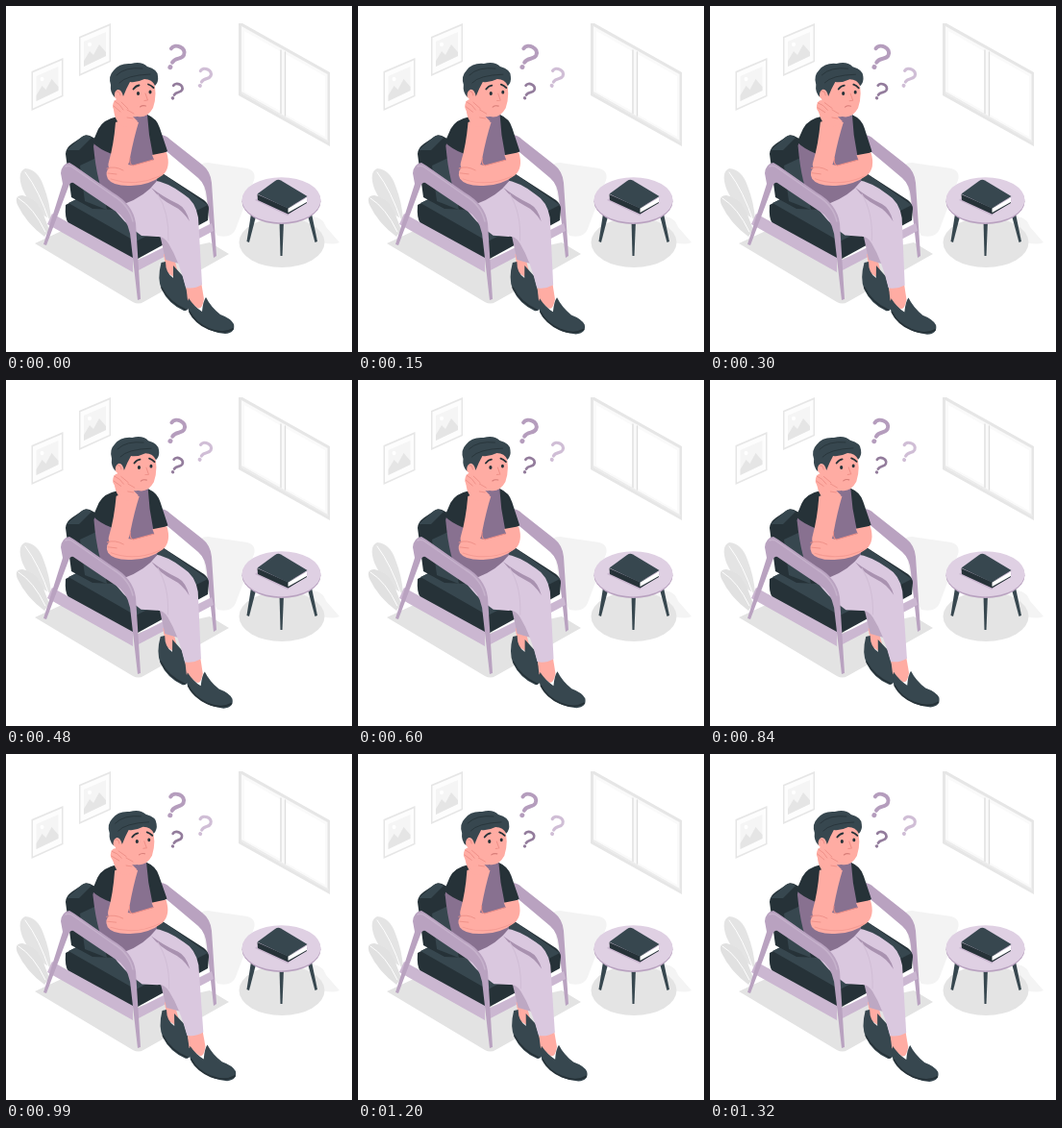
An HTML page with a canvas for the animation above (1350 ms loop, 360x360 px).

```html
<!DOCTYPE html>
<html lang="en">
<head>
<meta charset="utf-8">
<title>Thinking in an armchair</title>
<style>
html, body { margin: 0; width: 100%; height: 100%; overflow: hidden; background: #fff; }
canvas { display: block; width: 360px; height: 360px; }
</style>
</head>
<body>
<canvas id="stage" width="360" height="360"></canvas>
<script>
const ctx = document.getElementById('stage').getContext('2d');
const LOOP = 1350, STEP = 30;
const dark = '#263238', slate = '#37474f', skin = '#ffaca3', skinShade = '#ee8f87';
const lilac = '#cbb7d1', lilacDark = '#b9a2c0', pants = '#dac8df', vest = '#887190';

const paths = new Map();
function path(d) {
  if (!paths.has(d)) paths.set(d, new Path2D(d));
  return paths.get(d);
}
function fill(d, color) {
  ctx.fillStyle = color;
  ctx.fill(path(d));
}
function line(d, color, width = 1) {
  ctx.strokeStyle = color;
  ctx.lineWidth = width;
  ctx.stroke(path(d));
}
function oval(x, y, rx, ry, color, turn = 0) {
  ctx.fillStyle = color;
  ctx.beginPath();
  ctx.ellipse(x, y, rx, ry, turn, 0, Math.PI * 2);
  ctx.fill();
}
function turned(x, y, angle, draw) {
  ctx.save();
  ctx.translate(x, y);
  ctx.rotate(angle);
  ctx.translate(-x, -y);
  draw();
  ctx.restore();
}

function picture(x, y) {
  ctx.save();
  ctx.translate(x, y);
  fill('M0 0 L33 -14 V26 L0 41 Z', '#e6e6e6');
  fill('M1.5 1.2 L31.5 -11.6 V25 L1.5 38.5 Z', '#fdfdfd');
  fill('M5 5 L28 -5 V20 L5 31 Z', '#f5f5f5');
  fill('M5 25 L11 15 L15 19 L21 8 L28 16 V20 L5 31 Z', '#e5e5e5');
  oval(11, 8, 2, 2.3, '#fff');
  ctx.restore();
}

function windowFrame() {
  fill('M242 18 L246 18 L337 69 V146 L242 93 Z', '#e6e6e6');
  fill('M245 21 L334.5 71 V141 L245 91 Z', '#fafafa');
  fill('M248 26 L285 47 V109 L248 89 Z', '#fff');
  fill('M291 50 L332 73 V136 L291 113 Z', '#fff');
  line('M286 46 V112 M290.5 48 V114', '#dedede', 1.3);
  line('M245 90 L335 141', '#ececec', 1.5);
}

function floor() {
  fill('M203 172 Q200 163 210 163 L251 169 Q262 172 257 184 L239 232 Q235 242 220 239 L212 225 Z', '#f3f3f3');
  fill('M300 216 L324 220 Q330 222 333 230 L347 246 Q341 249 329 246 Z', '#f4f4f4');
  fill('M30 247 L58 234 L140 262 L212 246 L232 258 L143 308 Q138 311 132 308 Z', '#e3e3e3');
  oval(287, 246, 44.5, 26, '#e4e4e4');
}

function plant() {
  fill('M46 222 Q26 211 17 190 Q11 173 20 169 Q33 170 39 187 Q46 205 47 223 Z', '#e4e4e4');
  fill('M40 240 Q21 226 12 207 Q8 197 17 197 Q32 200 39 217 L45 233 Z', '#e1e1e1');
  line('M20 173 Q35 193 45 224 M13 200 Q29 210 41 235', '#fff', 1);
}

function chairBack() {
  fill('M160 134 Q166 134 171 139 L204 165 Q213 172 214 184 L219 260 L216 262 L209 200 Q208 186 200 179 L162 147 Z', lilacDark);
  fill('M136 265 L214 226 L216 234 L136 276 Z', lilac);
  fill('M62 207 L98 188 L158 171 L206 202 Q211 206 211 211 L210 223 L137 263 Q133 264 129 262 L65 226 Q61 222 62 207 Z', dark);
  fill('M65 205 L102 187 L158 171 L210 207 L135 245 Z', slate);
  fill('M62 154 Q62 148 69 143 L81 135 Q85 133 91 137 L114 150 L114 212 L90 211 L68 199 Z', dark);
  fill('M63 150 L79 136 Q84 133 89 137 L76 150 Z', slate);
  fill('M77 166 L94 158 L105 212 L82 203 Z', slate);
  fill('M48 216 L132 262 L132 277 L43 227 Z', lilac);
}

function chairFront() {
  fill('M57 174 Q58 164 66 163 L71 166 L111 194 Q132 206 135 226 L140 305 L137 306 L130 245 Q129 227 119 217 L70 184 Q67 183 65 188 L42 249 L39 248 L59 185 Z', lilacDark);
  line('M62 167 Q66 165 71 169 L111 197 Q128 207 132 224', '#c6b2cc', 1.5);
}

function legs() {
  fill('M164 258 L175 262 L181 286 L167 277 Z', skin);
  fill('M161.5 267 Q157 284 162 295 Q169 310 185 317 Q192 318 191 306 L184 281 L174 270 L174 283 Q166 278 166 266 Z', slate);
  line('M162 293 Q170 309 187 316', dark, 1.5);
  fill('M187 289 L203 287 L206 305 Q204 317 199 314 L189 306 Z', skin);
  fill('M190 304 Q186 318 198 328 Q212 340 228 341 Q239 340 237 331 Q234 325 223 321 Q213 313 208 303 Q205 307 204 318 Q196 313 190 304 Z', slate);
  line('M191 318 Q197 330 211 336 Q226 342 236 336', dark, 1.7);
  fill('M156 220 L176 240 L180 268 L166 264 Z', '#bda8c3');
  fill('M108 205 L131 188 L152 181 Q168 183 185 196 Q197 203 200 220 L204 290 Q195 295 187 293 Q180 265 169 247 Q164 239 157 240 L141 239 Q122 226 108 205 Z', pants);
  fill('M151 189 Q164 199 179 206 Q187 210 191 224 Q183 212 174 208 Q160 201 151 189 Z', '#a992b0');
  line('M158 196 Q170 215 169 244', '#d0bdd5', 1);
}

function torso() {
  fill('M118 100 L143 105 L146 124 L120 126 Z', skinShade);
  fill('M91 146 Q95 123 117 115 L147 113 Q158 119 160 140 L157 182 Q145 198 123 206 L106 205 Q95 188 91 146 Z', vest);
  fill('M147 113 Q157 117 160 127 L168 151 Q161 156 153 156 L149 134 Z', dark);
  fill('M116 115 Q101 118 96 128 L90 142 Q97 149 110 154 L114 140 Q119 129 118 119 Z', dark);
}

function arms() {
  fill('M152 155 L167 152 Q172 168 163 176 Q147 188 127 187 Q111 187 106 180 Q102 172 109 167 Q120 163 132 166 L154 160 Z', skin);
  fill('M114 121 Q124 116 138 121 Q133 137 129 158 Q127 172 116 173 Q104 171 107 162 Q112 145 114 121 Z', skin);
  line('M129 158 Q128 165 132 166 L153 160', skinShade, 1);
  line('M105 169 Q113 166 122 171 M106 174 L115 175', skinShade, .9);
  line('M109 180 Q134 189 160 177', '#f59b93', 1);
}

function head() {
  fill('M116 77 Q131 66 153 76 Q158 91 153 106 Q147 117 137 115 Q122 114 115 100 Z', skin);
  oval(116.5, 91, 4.8, 6.5, skin, -.2);
  line('M115 89 Q118 88 119 93', skinShade);
  fill('M113 95 Q108 90 109 82 Q106 73 112 67 Q118 59 130 60 Q141 57 147 63 Q158 66 158 73 Q159 79 155 83 Q152 76 144 76 Q136 80 129 79 Q125 86 122 94 Q120 86 116 87 Q112 89 113 95 Z', slate);
  line('M115 72 Q124 63 142 65 M118 80 Q125 72 150 71', dark, .8);
  oval(137.5, 91, 1.6, 2, dark);
  oval(150, 89.5, 1.5, 1.9, dark);
  line('M132.5 86.5 Q135 83 138.5 82.5 M148 81.5 Q151 82.5 153.5 85', dark, 1.8);
  line('M145 91 L147.5 98 L144 98.5', skinShade, 1);
  line('M139.5 105 Q142 103 145.5 104', '#d87d78', 1.1);
}

function hand(lift) {
  fill('M112 107 Q113 102 119 102 L130 108 Q137 109 139 113 Q138 116 132 115 L137 120 Q133 125 125 126 Q113 123 112 107 Z', skin);
  turned(124, 112, -.16 * lift, () => {
    fill('M111 105 Q111 99 115 97 Q118 96 120 100 L127 106 L124 117 L114 113 Z', skin);
    line('M113 99 Q119 102 122 108 M112 104 L119 110 M120 100 L127 107', skinShade, .9);
  });
  line('M126 108 L133 112 M126 116 L132 117', skinShade, .9);
}

function question(x, y, size, color, angle) {
  ctx.save();
  ctx.translate(x, y);
  ctx.rotate(angle);
  ctx.scale(size, size);
  line('M-7.2 -7 C-6 -14 8 -14 7.5 -5.5 C7 0 0 -.5 -.8 6', color, 4);
  oval(-1, 11.3, 2.5, 2.5, color);
  ctx.restore();
}

function table() {
  fill('M255 216 L260 219 L253 246 L250.5 245 Z', slate);
  fill('M314 218 L318 216 L324 245 L321.5 246 Z', slate);
  fill('M284.5 223 L289 223 L287.5 260 L285.5 260 Z', slate);
  oval(286.5, 203.2, 41, 23.8, lilacDark);
  oval(286.5, 201.8, 41, 23.6, '#dfd0e3');
  fill('M259 202 L283 184 L314 202 L293 218 Z', '#c9b6cf');
  fill('M261.5 196 L293 210 L313 201 V205 L293.5 216.5 L262 202 Z', dark);
  fill('M293.5 210.5 L313 199.5 V204 L293.5 215 Z', '#fff');
  fill('M261.5 195.5 L280 182 Q283 180 286 181.5 L313.5 198 L293 210.5 Z', slate);
}

function draw(time) {
  const sway = Math.sin(2 * Math.PI * time / LOOP);
  ctx.clearRect(0, 0, 360, 360);
  ctx.lineCap = ctx.lineJoin = 'round';
  picture(26.5, 68);
  picture(76, 32);
  windowFrame();
  floor();
  plant();
  chairBack();
  turned(170, 195, .014 * sway, legs);
  turned(130, 200, .011 * sway, torso);
  chairFront();
  turned(130, 200, .011 * sway, () => {
    arms();
    head();
    hand(sway * sway);
  });
  table();
  question(176 + .4 * sway, 53.5, 1, '#b59dbd', .38 + .03 * sway);
  question(177 + .3 * sway, 89, .68, '#937c9c', .38 + .04 * sway);
  question(205.8, 74.8, .8, '#d0bed6', .36 + .04 * sway);
}

const start = performance.now();
function tick() {
  const time = (performance.now() - start) % LOOP;
  draw(Math.floor(time / STEP) * STEP);
  requestAnimationFrame(tick);
}
tick();
</script>
</body>
</html>
```
